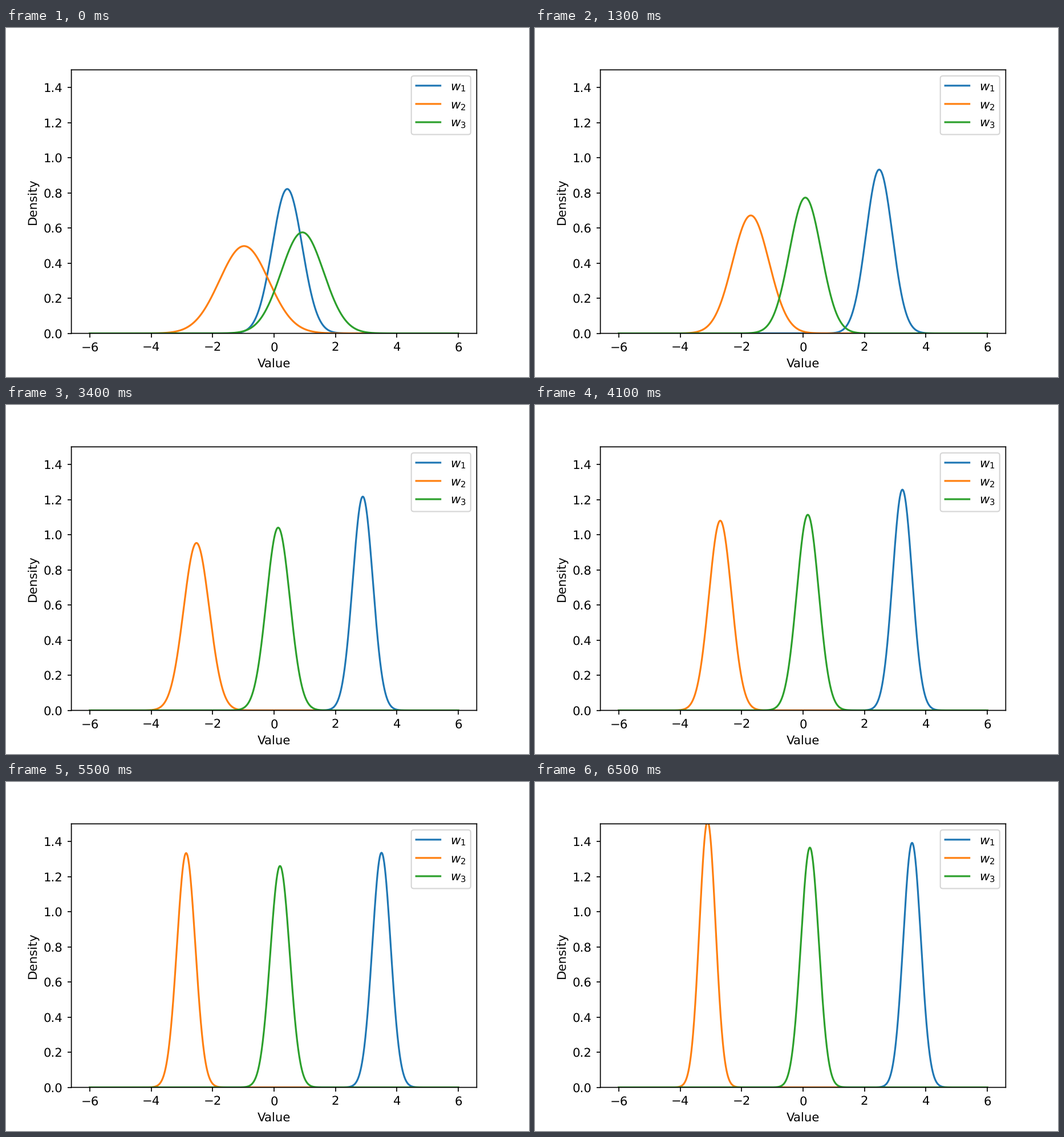
A matplotlib script for the animation above (7600 ms loop, 917 by 611 pixels).

```python
import numpy as np
import matplotlib.pyplot as plt
from matplotlib.animation import FuncAnimation

STEPS = 65      # last moving step, then the picture holds
FRAMES = 76
INTERVAL = 100  # ms

# Unhinted, unsnapped drawing keeps sub-pixel positions
plt.rcParams.update({"path.snap": False, "text.hinting": "none"})


def track(*keys):
    """Straight-line motion through a few (step, value) keys."""
    steps, values = zip(*keys)
    return lambda step: np.interp(step, steps, values)


def bell(x, mean, peak):
    """Normal density given by its mean and its height."""
    return peak * np.exp(-np.pi * (peak * (x - mean)) ** 2)


# Each weight: the paths of its mean and of its peak density
WEIGHTS = [
    (track((0, .43), (13, 2.48), (34, 2.89), (49, 3.63), (60, 3.39), (65, 3.55)),
     track((0, .822), (23, 1.017), (34, 1.217), (65, 1.392))),
    (track((0, -.975), (23, -2.26), (49, -2.89), (60, -2.84), (65, -3.11)),
     track((0, .497), (34, .953), (65, 1.515))),
    (track((0, .923), (13, .075), (65, .222)),
     track((0, .575), (23, .925), (65, 1.365))),
]

fig, ax = plt.subplots(figsize=(6.0032, 4), dpi=152.76)
fig.subplots_adjust(left=.125, right=.9, bottom=.125, top=.88)

x = np.linspace(-6, 6, 1000)
lines = [ax.plot(x, 0 * x, label=f"$w_{n}$")[0] for n in (1, 2, 3)]
ax.set(xlim=(-6.6, 6.6), ylim=(0, 1.5), xlabel="Value", ylabel="Density")
ax.legend(loc="upper right")


def update(i):
    step = min(i, STEPS)
    for line, (mean, peak) in zip(lines, WEIGHTS):
        line.set_ydata(bell(x, mean(step), peak(step)))
    return lines


anim = FuncAnimation(fig, update, frames=FRAMES, interval=INTERVAL,
                     repeat=True, repeat_delay=0)
plt.show()
```
